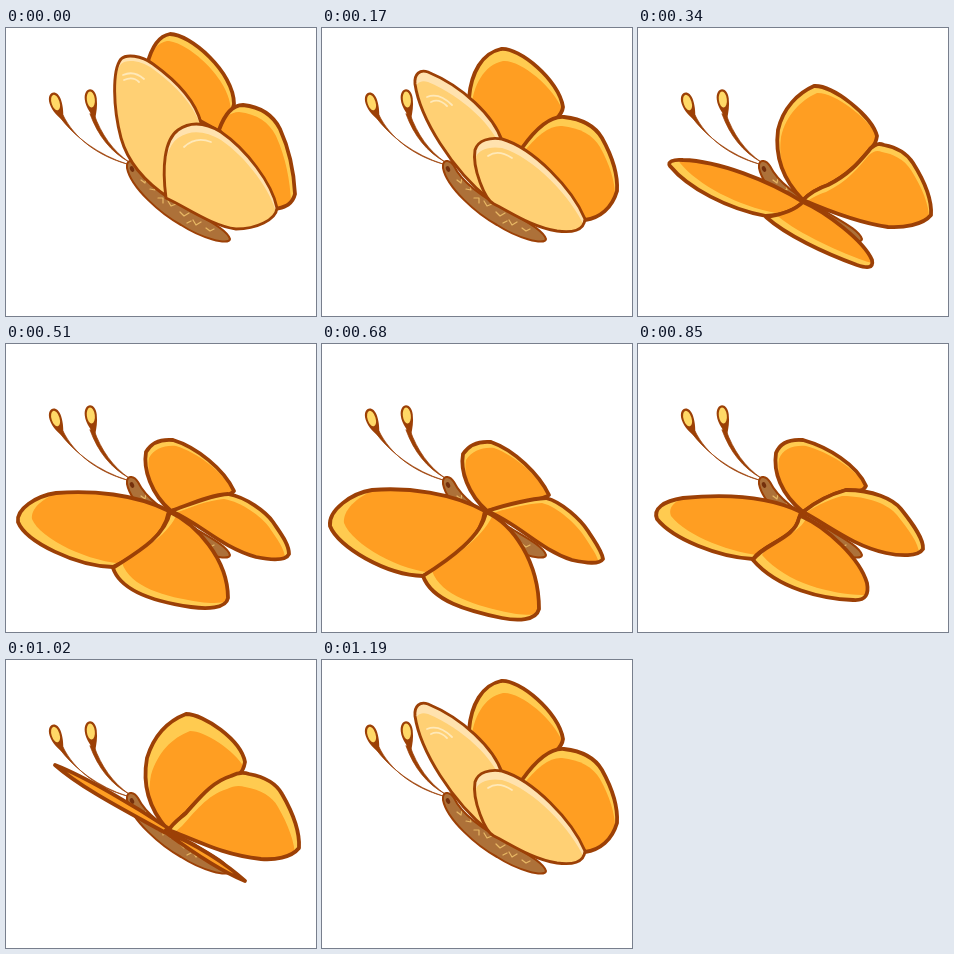
Write an HTML page with a canvas that moves like this. It is 310x288 px and loops after 1.36 s.

```html
<!DOCTYPE html>
<html lang="en">
<head>
<meta charset="utf-8">
<title>Butterfly</title>
<style>
html, body { margin: 0; width: 100%; height: 100%; overflow: hidden; background: #fff; }
canvas { display: block; width: 310px; height: 288px; }
</style>
</head>
<body>
<canvas id="stage" width="310" height="288"></canvas>
<script>
const ctx = document.getElementById('stage').getContext('2d');
const STEP = 170;
const LINE = '#9c4006';
const ORANGE = { base: '#ff9e22', edge: '#ffcb50', line: 3.8 };
const PALE = { base: '#ffd074', edge: '#ffe2ae', line: 2.9 };

// The inner colour is the wing shifted by dx, dy, leaving a lit rim.
const wing = (d, dx, dy, tone = ORANGE) => ({ path: new Path2D(d), dx, dy, tone });
const pose = (wings, shine = '') => ({ wings, shine: new Path2D(shine) });

const upright = pose([
  wing('M194 93C184 70 166 50 141 37C145 21 152 8 164 6C184 6 228 44 228 76C226 87 220 95 214 104Z', -3, 7),
  wing('M213 102C218 88 225 77 237 77C255 79 267 87 274 101C284 123 288 146 289 166C286 178 277 179 270 181Z', -4, 7),
  wing('M163 170C139 154 122 135 115 110C107 80 106 42 115 31C120 26 135 27 147 36C172 54 190 75 195 95Z', 0, 5, PALE),
  wing('M160 170C156 140 158 112 172 102C185 93 200 95 215 104C240 121 266 155 271 180C270 192 250 201 230 201C206 198 180 179 160 170Z', 0, 8, PALE)
], 'M117 47Q128 42 138 51M118 52Q127 48 133 54M178 119Q190 108 205 114');

const raised = pose([
  wing('M147 70C149 45 160 25 179 21C197 19 237 52 241 79C240 90 224 100 200 120L160 125Z', 2, 12),
  wing('M200 120C215 99 230 88 242 89C260 91 273 98 280 110C290 128 296 147 295 163C290 180 278 190 263 192Z', -2, 9),
  wing('M168 172C130 142 98 90 93 56C92 46 98 41 106 44C140 58 172 88 180 113Z', 0, 10, PALE),
  wing('M172 176C163 172 150 140 153 122C156 112 168 109 180 111C211 120 250 160 263 191C262 203 250 205 235 203C210 199 190 185 172 176Z', 0, 9, PALE)
], 'M105 69Q117 64 130 77M109 74Q117 70 125 78M166 128Q176 121 190 130');

const lowered = pose([
  wing('M165 172C143 150 137 125 140 102C145 80 160 65 176 58C195 57 234 88 239 108C238 114 237 116 233 120C222 133 212 146 190 157C178 161 172 165 165 172Z', 3, 7),
  wing('M165 172C172 165 178 161 190 157C212 146 222 133 233 120C238 116 241 115 246 117C257 119 268 124 275 135C287 154 294 172 293 187C285 197 265 200 250 199C222 195 195 185 165 172Z', -2, 7),
  wing('M165 174C130 152 80 133 45 132C35 131 29 134 32 138C50 160 90 181 128 188C142 187 156 183 165 174Z', 10, -3),
  wing('M165 174C188 184 226 213 234 232C236 241 228 240 219 237C186 225 148 207 128 189C142 187 156 183 165 174Z', 8, -4)
]);

const spread = pose([
  wing('M165 167C145 150 137 125 140 108C145 99 155 95 167 96C190 103 218 125 228 147C225 152 200 158 165 167Z', 3, 6),
  wing('M165 167C185 160 205 151 222 150C240 153 260 168 267 178C275 190 283 200 283 210C280 217 265 216 250 213C215 203 195 180 165 167Z', -4, 5),
  wing('M163 167C130 150 85 146 50 149C30 152 10 165 12 178C20 198 70 222 107 223C130 212 158 195 163 167Z', 14, -3),
  wing('M164 168C190 180 222 215 222 254C220 265 200 265 185 263C150 258 115 248 107 224C130 209 159 193 164 168Z', 9, -5)
]);

const lowest = pose([
  wing('M165 167C146 150 138 127 141 110C147 101 157 97 169 98C192 106 217 130 227 151C223 155 200 159 165 167Z', 3, 6),
  wing('M165 167C187 160 207 155 224 154C240 158 259 176 266 187C273 198 280 207 281 215C277 221 264 219 250 216C217 205 197 180 165 167Z', -4, 5),
  wing('M163 167C130 149 86 143 50 146C30 149 6 166 8 182C16 203 64 231 101 232C128 218 159 197 163 167Z', 14, -3),
  wing('M164 168C191 180 217 218 217 265C214 277 195 277 180 274C146 267 110 257 101 232C128 215 160 192 164 168Z', 9, -5)
]);

const rising = pose([
  wing('M165 168C143 150 135 128 138 109C142 99 152 95 165 96C190 103 219 121 228 142C225 148 219 147 208 146C190 151 176 159 165 168Z', 3, 6),
  wing('M165 168C176 159 190 151 208 146C235 146 255 155 263 165C275 180 286 195 285 205C280 213 262 212 248 209C215 202 190 181 165 168Z', -4, 6),
  wing('M163 168C130 152 85 150 45 154C25 157 15 165 19 175C35 195 80 213 115 215C125 200 157 195 161 174Z', 14, -3),
  wing('M163 172C190 184 222 215 229 239C231 250 228 257 215 256C185 255 140 245 115 216C125 200 157 195 161 174Z', 9, -5)
]);

const edgeOn = pose([
  wing('M161 169C140 145 137 120 141 98C148 75 162 61 180 54C198 54 235 80 239 102C238 108 236 112 233 114C205 122 192 140 180 153C172 160 166 164 163 170Z', 4, 17),
  wing('M163 170C166 164 172 160 180 153C192 140 205 122 225 116C231 113 237 112 243 114C259 117 270 123 276 134C287 153 294 172 293 188C285 198 268 200 255 199C220 195 200 185 163 170Z', -4, 13),
  wing('M49 105C80 117 130 147 162 168L158 172C120 151 75 128 49 105Z', 0, 1),
  wing('M159 172C187 182 222 205 239 221C214 211 185 191 159 172Z', 0, 1)
]);

const cycle = [upright, raised, lowered, spread, lowest, rising, edgeOn, raised];

const body = new Path2D('M121 137C122 131 128 132 132 138C140 155 165 172 190 185C205 194 222 203 224 211C223 218 195 210 175 197C155 186 125 160 121 140Z');
const flecks = new Path2D('M135 152l4 3l1-5M144 161l5 1l-1-5M152 170l5 0l0 5M162 173l3 5l5-2M174 184l4 4l5-3M187 192l3 5l5-3M200 200l4 3l4-2M181 195l4-2');
const stalks = new Path2D('M53 88C68 109 93 127 121 136C92 128 68 110 57 87ZM84 86C92 108 105 124 123 134C107 123 95 106 88 86Z');

function stroke(path, color, width) {
  ctx.strokeStyle = color;
  ctx.lineWidth = width;
  ctx.stroke(path);
}

function fill(path, color) {
  ctx.fillStyle = color;
  ctx.fill(path);
}

function drawTip(x, y, angle) {
  ctx.save();
  ctx.translate(x, y);
  ctx.rotate(angle);
  fill(new Path2D('M-6 -2C-6 -15 6 -15 6 -2C6 6 4 12 2 18C-1 14 -6 6 -6 -2Z'), LINE);
  ctx.beginPath();
  ctx.ellipse(0, -1.5, 4, 8, 0, 0, Math.PI * 2);
  ctx.fillStyle = '#ffd967';
  ctx.fill();
  ctx.restore();
}

function drawBody() {
  fill(stalks, LINE);
  stroke(stalks, LINE, 0.7);
  drawTip(50, 76, -0.3);
  drawTip(85, 73, -0.12);
  fill(body, '#ad7139');
  stroke(flecks, '#e8b865', 1.2);
  stroke(body, LINE, 2);
  ctx.beginPath();
  ctx.ellipse(126, 141, 2, 3, -0.4, 0, Math.PI * 2);
  ctx.fillStyle = '#74300c';
  ctx.fill();
}

function drawWing({ path, dx, dy, tone }) {
  fill(path, tone.edge);
  ctx.save();
  ctx.clip(path);
  ctx.translate(dx, dy);
  fill(path, tone.base);
  ctx.restore();
  stroke(path, LINE, tone.line);
}

function render(now) {
  const { wings, shine } = cycle[Math.floor(now / STEP) % cycle.length];
  ctx.fillStyle = '#fff';
  ctx.fillRect(0, 0, 310, 288);
  ctx.lineJoin = ctx.lineCap = 'round';
  drawBody();
  wings.forEach(drawWing);
  stroke(shine, '#ffe9b9', 1.8);
}

const start = performance.now();
function tick() {
  render(performance.now() - start);
  requestAnimationFrame(tick);
}
tick();
</script>
</body>
</html>
```
